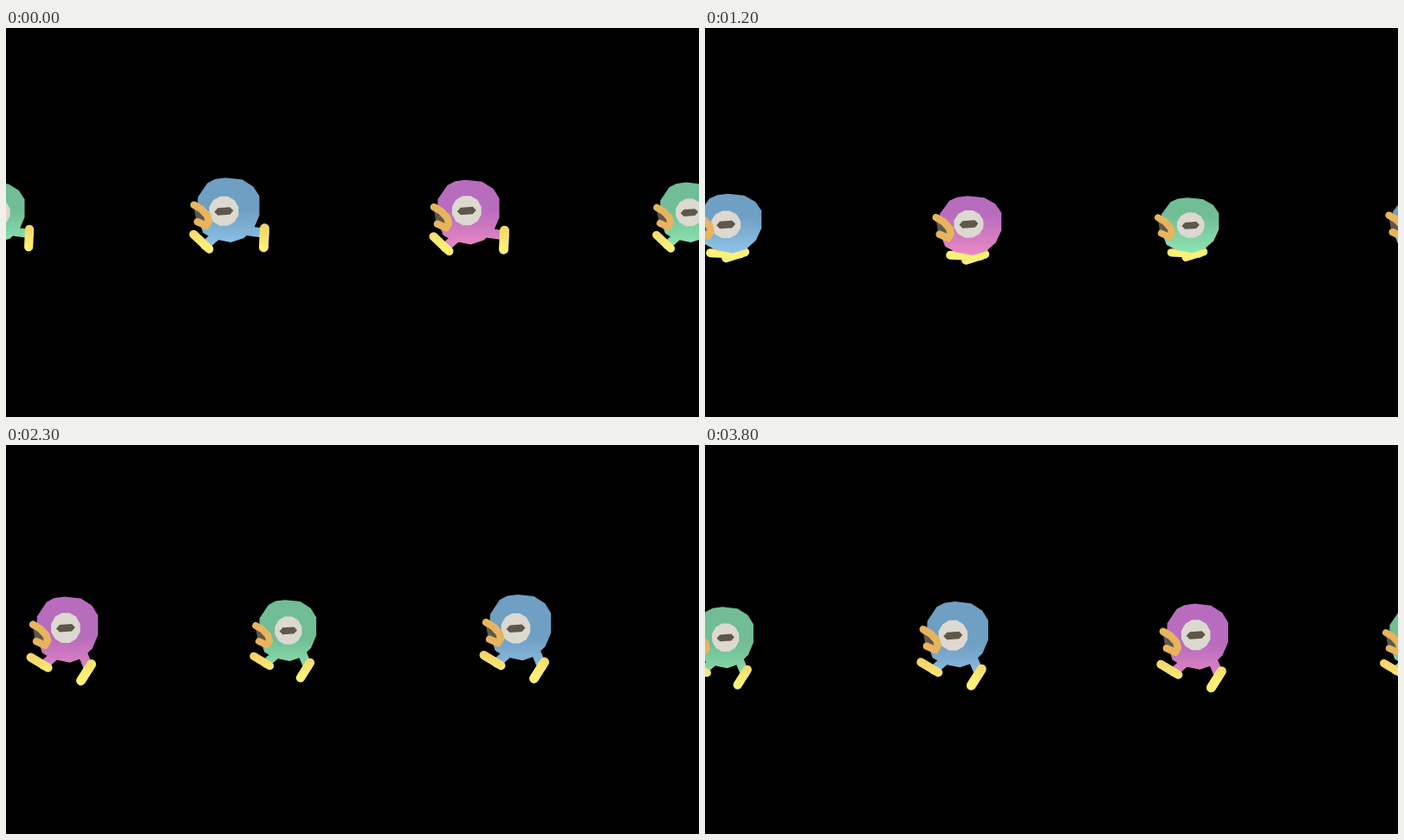
An HTML page with a canvas for the animation above (3900 ms loop, 800 px wide and 450 px high).

```html
<!DOCTYPE html>
<html lang="en">
<head>
<meta charset="utf-8">
<title>Running birds</title>
<style>
  html, body { margin: 0; width: 100%; height: 100%; overflow: hidden; background: #000; }
  canvas { display: block; }
</style>
</head>
<body>
<canvas id="stage" width="800" height="450"></canvas>
<script>
const ctx = document.getElementById('stage').getContext('2d');
const LOOP = 3900, TICK = 100, WRAP = 800;
const SPEED = 0.2015, SINK = 0.0054;

const birds = [
  { x: 271, y: 219.7, size: 1, eye: [-4, 1], top: '#6f9fc2', low: '#93c8ee' },
  { x: 548, y: 222.2, size: 1, eye: [-0.7, -2], top: '#b86cbe', low: '#ee8cc4' },
  { x: 801.5, y: 221.7, size: 0.93, eye: [2, 0], top: '#71bd95', low: '#93eab6' }
];

// Each foot: toe x, toe y, heel x, heel y, relative to the body centre.
const stance = [
  { dx: -1, rise: 0, sx: 1, sy: 0.93, beak: -3.5, front: [-17, 35.5, 5, 37.5], back: [8, 36, 20, 31], sole: [12, 9] },
  { dx: -1, rise: 0, sx: 1, sy: 0.93, beak: -3.5, front: [-22, 34, 0, 35], back: [-4, 40, 18, 33], sole: [10, 10] }
];
const flight = [
  { dx: -15, rise: 21, sx: 0.99, sy: 1.03, beak: 0, front: [-41, 32, -21, 44], back: [17, 59, 29, 40] },
  { dx: -10, rise: 28, sx: 0.97, sy: 1.04, beak: 0, front: [-47, 29, -29, 45], back: [41, 45, 44, 19] },
  { dx: -7, rise: 28, sx: 0.97, sy: 1.04, beak: 0, front: [-47, 28, -33, 45], back: [47, 38, 45, 14] },
  { dx: -13, rise: 17, sx: 0.99, sy: 1.03, beak: 0, front: [-42, 28, -24, 45], back: [44, 42, 44, 18] }
];
const landing = { dx: -15.5, rise: 9, sx: 1, sy: 1.01, beak: 0, front: [-39, 28, -21, 45], back: [42, 43, 43, 21] };

const bodyShape = [[-23, -31], [-14, -35.5], [-2, -37], [17, -35], [30, -27], [37, -16], [37, 6],
  [30.5, 21], [19, 32], [4, 37], [-16, 33], [-28, 26], [-35, 6], [-34, -15]];
const pupilShape = [[-11, 1], [-7, -3.5], [7, -4.5], [11, -0.5], [7, 4], [-7, 5]];
const mouthShape = [[-38.5, -3], [-26, 4], [-25, 15], [-36, 12]];
const beakLine = [[-38.5, -6], [-30, -1], [-23, 6.5], [-21.5, 13], [-24.5, 18], [-34.5, 13.5]];
const eyeShape = Array.from({ length: 12 }, (_, i) => {
  const a = (i + 0.5) * Math.PI / 6;
  return [17.5 * Math.cos(a), 17.5 * Math.sin(a)];
});

function fillShape(points, color, ox = 0, oy = 0, sx = 1, sy = 1) {
  ctx.beginPath();
  for (const [x, y] of points) ctx.lineTo(ox + x * sx, oy + y * sy);
  ctx.closePath();
  ctx.fillStyle = color;
  ctx.fill();
}

function strokePath(points, color, width) {
  ctx.beginPath();
  for (const [x, y] of points) ctx.lineTo(x, y);
  ctx.strokeStyle = color;
  ctx.lineWidth = width;
  ctx.stroke();
}

function fade(from, to, top, low) {
  const g = ctx.createLinearGradient(0, from, 0, to);
  g.addColorStop(0, top);
  g.addColorStop(1, low);
  return g;
}

function drawLeg(hip, [tx, ty, hx, hy], skin, sole, width) {
  const ankle = [tx + (hx - tx) * 0.75, ty + (hy - ty) * 0.75];
  strokePath([hip, ankle], skin, 11);
  strokePath([[tx, ty], [hx, hy]], sole, width);
}

function drawBird(bird, pose, x, y, sink) {
  const { size, eye } = bird;
  const local = stageY => (stageY + sink - y) / size;
  const skin = fade(local(210), local(260), bird.top, bird.low);
  const sole = fade(local(202), local(254), '#e8b45e', '#fcf176');
  const [frontWidth, backWidth] = pose.sole || [10, 11];

  ctx.save();
  ctx.translate(x, y);
  ctx.scale(size, size);
  drawLeg([17, 23], pose.back, skin, sole, backWidth);
  drawLeg([-10, 27], pose.front, skin, sole, frontWidth);
  fillShape(bodyShape, skin, 0, 0, pose.sx, pose.sy);
  fillShape(eyeShape, '#dcd9d1', eye[0], eye[1], pose.sx, pose.sy);
  fillShape(pupilShape, '#5f574a', eye[0], eye[1]);
  ctx.translate(0, pose.beak);
  fillShape(mouthShape, '#5f574a');
  strokePath(beakLine, '#e8b45e', 8.5);
  ctx.restore();
}

function poseAt(tick) {
  if (tick === 0) return landing;
  const step = (tick + 3) % 5;
  return step ? flight[step - 1] : stance[Math.floor((tick + 3) / 5) % 2];
}

function draw(now) {
  const tick = Math.floor((now % LOOP) / TICK);
  const time = tick * TICK, sink = SINK * time, pose = poseAt(tick);
  ctx.fillStyle = '#000';
  ctx.fillRect(0, 0, 800, 450);
  for (const bird of birds) {
    const travel = bird.x - SPEED * time + pose.dx * bird.size;
    const x = ((travel % WRAP) + WRAP) % WRAP;
    const y = bird.y + sink - pose.rise * bird.size;
    for (const shift of [-WRAP, 0, WRAP]) drawBird(bird, pose, x + shift, y, sink);
  }
}

ctx.lineCap = ctx.lineJoin = 'round';
const start = performance.now();
function loop() {
  draw(performance.now() - start);
  requestAnimationFrame(loop);
}
loop();
</script>
</body>
</html>
```
